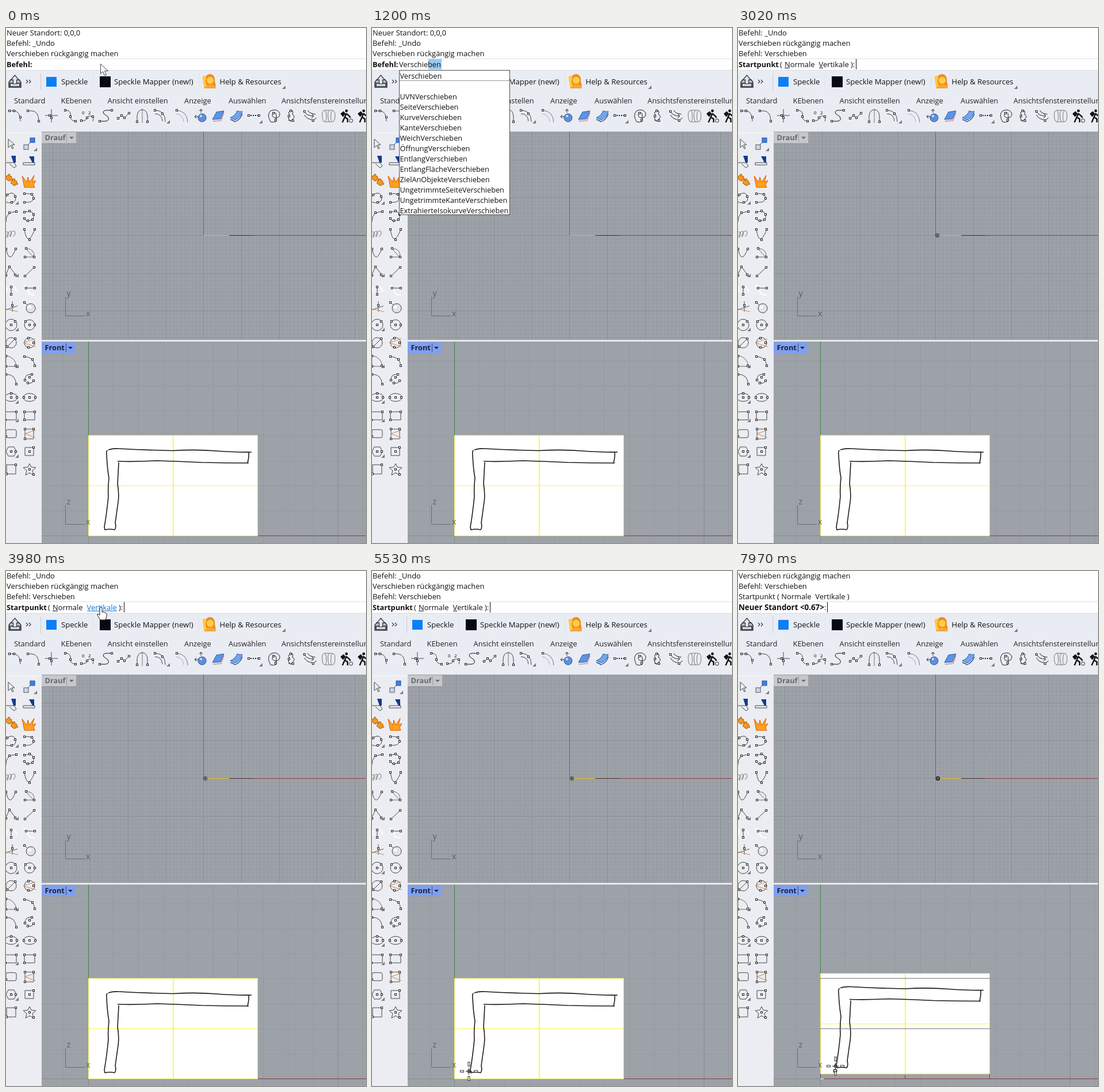
Write an HTML page that moves like this. It is 626 by 895 pixels and loops after 8 s.

```html
<!DOCTYPE html>
<html lang="de">
<head>
<meta charset="utf-8">
<title>Verschieben</title>
<style>
html, body { margin: 0; width: 100%; height: 100%; overflow: hidden; background: #fff; }
svg { display: block; width: 626px; height: 895px; font: 12.75px "Open Sans", "Noto Sans", sans-serif; }
text { white-space: pre; }
.b { font-weight: 700; }
.big { font-size: 13.35px; }
.log { font-size: 12.9px; }
.bar { font-size: 13.1px; }
.tab { font-size: 12.85px; }
</style>
</head>
<body>
<svg id="stage" viewBox="0 0 626 895" xmlns="http://www.w3.org/2000/svg"></svg>
<script>
const stage = document.getElementById('stage');

// ---- helpers ----
const rect = (x, y, w, h, fill, more = '') => `<rect x="${x}" y="${y}" width="${w}" height="${h}" fill="${fill}" ${more}/>`;
const path = (d, stroke = '#222', w = 1, fill = 'none') => `<path d="${d}" stroke="${stroke}" stroke-width="${w}" fill="${fill}"/>`;
const fill = (d, c) => path(d, 'none', 0, c);
const circle = (x, y, r, f = 'none', s = '#222', w = 1) => `<circle cx="${x}" cy="${y}" r="${r}" fill="${f}" stroke="${s}" stroke-width="${w}"/>`;
const text = (x, y, s, cls = '', c = '#111') =>
  `<text x="${x}" y="${y}" class="${cls}" fill="${c}">${s.replace(/&/g, '&amp;').replace(/</g, '&lt;')}</text>`;
const hLine = (x1, x2, y, c) => rect(x1, y, x2 - x1, 1, c);
const vLine = (x, y1, y2, c) => rect(x, y1, 1, y2 - y1, c);
const knots = s => s.split(' ').filter(Boolean).map(p => {
  const [x, y] = p.split(',').map(Number);
  return rect(x - 1.5, y - 1.5, 3, 3, '#fff', 'stroke="#222"');
}).join('');
const icon = (x, y, d, pts = '', c = '#444', extra = '') =>
  `<g transform="translate(${x} ${y})">${path(d, c)}${extra}${knots(pts)}</g>`;
const corner = (x, y) => fill(`M${x} ${y}v-6l-6 6z`, '#777b82');

// ---- command area and toolbars ----
function toolbars() {
  let s = rect(0, 73, 626, 107, '#e9ecf3') + rect(0, 180, 62, 715, '#ebedf2');
  s += hLine(0, 626, 53, '#dfe1e5') + hLine(0, 626, 73, '#d9dce2') + hLine(0, 62, 182, '#f8f9fb');
  s += path('M60.5 79V108', '#c8ccd4') + path('M151.5 79V108M335.5 79V108', '#e0e3ea');
  s += path('M8 90H23L26 94V103H5V94Z', '#2d3035', 1.4, '#b9bdc4') + rect(5, 95, 21, 8, '#474b52')
     + rect(8, 97, 15, 4, '#d5d8de') + path('M12.5 97V90H8.5L15.5 82L22 90H18.5V97Z', '#333', 1.2, '#dfe6f0');
  s += path('M35 90l3 3-3 3M40 90l3 3-3 3', '#333', 1.1);
  s += rect(70, 85, 18, 17, '#0d7ff5') + text(96, 98, 'Speckle', 'bar');
  s += rect(163, 84, 19, 19, '#060a16') + text(188, 98, 'Speckle Mapper (new!)', 'bar');
  s += fill('M346 89Q347 80 356 80Q364 82 363 92L365 101H347Z', '#f08c24')
     + circle(355, 91, 6, '#ffd04a', 'none') + fill('M344 105Q345 99 355 98Q365 98 365 105Z', '#f4a63c')
     + fill('M342 87Q341 82 344 84L346 82Q350 85 347 92L349 102H344Z', '#ffc93c');
  s += text(371.5, 98, 'Help & Resources', 'bar') + corner(486, 106);
  [[14, 'Standard'], [95.5, 'KEbenen'], [176.5, 'Ansicht einstellen'], [310, 'Anzeige'],
   [387, 'Auswählen'], [479, 'Ansichtsfenstereinstellungen']].forEach(([x, t]) => s += text(x, 131, t, 'tab', '#222'));
  return s + topIcons() + sideIcons();
}

function topIcons() {
  const y = 153, walker = circle(0, -9, 2.4, '#111', 'none')
    + path('M0-5L-3 2L2 5V11M-3 2L-7 11M0-4L5 0L7 3', '#111', 2.4) + path('M-10-4L-5-8L-2-4L-6 1Z', '#111', 1, '#111')
    + circle(8, 8, 3, '#e9ecf3', '#333');
  return [
    icon(16, y, 'M-10-9H-1Q9-7 9 9', '-10,-9 -2,-9 9,2'),
    icon(48, y, 'M-10-9H-3Q9-8 9 9', '-10,-9 9,9'),
    icon(79, y, 'M-11-1H11M0-12V11', '-3,-1 0,3'),
    icon(112, y, 'M-10-10H-6Q2-8 0 1Q0 8 9 9', '-9,-10 0,1 9,9'),
    icon(142, y, 'M-11 8Q-2 9-1 3Q1-2 9 1Q11 4 9 9', '-11,8 -1,3 9,1', '#444',
      '<text x="-10" y="-3" font-size="8">0</text><text x="1" y="-3" font-size="8">2</text>'),
    icon(174, y, 'M10-10H0Q-7-9-4-4L3 1Q7 8-1 9H-11', '10,-10 -11,9', '#111'),
    icon(205, y, 'M-10 4L-4-1L1 3L9-5', '-10,4 -4,-1 1,3 9,-5'),
    icon(237, y, 'M-9 11V0Q-8-11 0-11Q8-11 9 0V11', '-9,10 9,10', '#444', path('M0-13V12', '#777')),
    icon(269, y, 'M-10-10Q8-10 8 10M-10-4Q2-4 3 9', '-10,-10 3,-4'), corner(285, 166),
    icon(306, y, 'M-10-10Q9-9 10 11', '-9,-10', '#777', path('M-10-4Q2-2 3 10', '#aaa')),
    icon(339, y, 'M-11 1H-5M-8-2L-11 1L-8 4M0-6V-12M-3-9L0-12L3-9', '', '#222', circle(2, 3, 7, '#5f8fdd', '#294f94') + circle(0, 0, 2, '#cfe0ff', 'none')),
    icon(369, y, '', '', '', path('M-10 6L-3-7L10-9L4 5Z', '#2f5da6', 1, '#5c94e6') + path('M-9 9L5 8L10-6', '#c98686', 1.3)),
    icon(400, y, '', '', '', path('M-10 3Q-1-1 2-9Q6-7 11-8Q8 3-2 7Q-6 4-10 3Z', '#2f5da6', 1, '#72a5ec') + path('M-10 6Q-5 7-2 10Q8 6 11-4', '#294f94', 1.3)),
    icon(432, y, 'M-11-1H11', '-10,-1 8,-1', '#e9ecf3', [-7, -3, 1, 5].map(x => rect(x, -2, 2, 2, '#222')).join('')), corner(446, 166),
    icon(466, y, 'M-6 10Q-13-2-6-9Q5-14 10-5Q11 4 1 3Q-6 0-1-5Q4-8 4 0V9Q0 12-6 10Z', '-1,-5 3,7', '#222'),
    icon(496, y, 'M-2-11Q5-10 2-3Q8 0 3 5Q-1 10-5 7M2-9Q-8-8-3-2Q-8 4 0 10', '-1,-9 -4,0 3,8', '#222'),
    icon(529, y, 'M-10-8Q-6 0 6 0L3-4M6 0L2 4M-10-2Q-6 6 6 7L11 3M-4-10Q-3-5 9-3', '-10,-8 5,8', '#222'),
    icon(561, y, 'M-7-10Q-12-9-11 0Q-11 9-7 10Q-3 8-4 0Q-4-9-7-10ZM-7-10H6M-7 10H6M2-10Q-2-8-1 0Q-1 9 2 10M7-10Q12-8 11 0Q11 9 7 10Q3 8 4 0Q4-8 7-10Z', '', '#777'),
    icon(592, y, '', '', '', walker), icon(622, y, '', '', '', walker)
  ].join('');
}

function sideIcons() {
  const A = 9, B = 41, navy = '#173a8f', ring = (r = 9) => `M${-r} 0a${r} ${r} 0 1 0 ${2 * r} 0a${r} ${r} 0 1 0 ${-2 * r} 0`;
  const oval = 'M-11 0a11 7 0 1 0 22 0a11 7 0 1 0-22 0';
  const piece = 'M-4-4L-1-5Q-2-8 1-7Q3-6 1-4L5-3L4 0Q8 0 6 3Q4 4 3 2L2 5L-2 4Q-2 1-4 2Q-7 1-5-1Z';
  const rows = [
    [201, ['M-5-8V7L-1 3L2 9L4 8L1 2H6Z', ''], ['M-6 5L4-5', '', '#444', rect(1, -10, 8, 8, '#3f80e8', 'stroke="#1d4fa6"') + rect(-10, 2, 8, 8, '#c8d9f4', 'stroke="#555"')]],
    [232, ['M-9 2H5L9 8L5 11L-3 4', '', '#444', fill('M0-10H8V2H4Z', navy)], ['M-11 2H9V6H-11Z', '', '#444', fill('M-1-9H8V2H5Z', navy)]],
    [265, ['', '', '', `<g transform="translate(-4 -4)">${path(piece, '#b05c08', 1, '#f49a20')}</g><g transform="translate(5 4)">${path(piece, '#b05c08', 1, '#f49a20')}</g>`],
          ['', '', '', path('M-9 12L-13-8L-5 3L-3-6L0 3L8-9L5 3L11 0L7 7L9 12Z', '#e05a08', 1, '#ffa11c')]],
    [296, ['M-6-7Q5-13 8-2Q8 7 1 7Q-12 10-10 0Q-9-5-6-7', '-7,-6 7,-3 1,7'], ['M-9-8Q7-10 7 0Q6 8-9 7', '-9,-8 4,-7 7,0 -9,7']],
    [327, ['M-9 10Q-10-8 10-8', '9,-8 -3,-6'], ['M-9-7Q4-11 7-3Q9 7-2 8Q-8 8-9 4', '-9,-7 0,-9 7,-3 5,6 -3,8 -9,4']],
    [359, ['M-10 7Q-12-5-7-5Q-3-4-6 4Q-8 7-7 0Q-3-8 0-5Q2 0-2 4Q-3 0 1-5Q7-9 7-2Q6 3 3 3', '', '#777'], ['M-9-9Q-4 24 9-9', '-9,-9 0,9 9,-9']],
    [391, ['M-9-8Q-3 22 8-8', '-9,-7 8,-7'], ['M-7-8Q11-7 7 8M-9 7H7L-7-8', '-6,-8 -8,7 8,7', '#666']],
    [423, ['M-10 7L-3-8L8 6', '-3,-8 -9,7 7,6'], ['M-8 8L8-7', '-8,8 8,-7']],
    [455, ['M0 8V-5', '0,-5 0,8', '#444', path('M-10-7Q-6-3-8 4M3-7Q9-3 9 4', '#fff', 2)], ['M-6-3H9', '-6,-3 9,-3', '#444', path('M-11-8Q-4-7-3 2Q-2 9 9 9', '#fff', 2)]],
    [485, ['M-10 5L11-2M2-10V8', '2,-3', '#555', path('M-10 3L12 8', '#d08850')], ['M-9-8L0 0', '-9,-8', '#444', circle(2, 2, 8, '#dfe2e8', '#444') + circle(0, 0, 3, '#f7f8fa', 'none')]],
    [516, [ring(10), '0,0 7,-6'], [ring(9), '-7,-6 0,0 9,0']],
    [547, [ring(9) + 'M-7 7L7-7', '-7,7 7,-7'], [ring(9), '-2,-8 -2,8 7,0', '#444', path('M-11 0L10-7M-11 0L11 7', '#d08850')]],
    [579, ['M-9-10V9H9Q8-6-9-10', '-9,-9 -9,9 8,8', '#666'], ['M-10-8Q8-8 9 9', '-9,-8 5,-3 9,8']],
    [610, ['M-9-8Q8-9 9 11', '-9,-8 9,9'], ['M-8 3Q-9-10 5-8M8 2Q2 11-4 5', '-8,2 0,-3 4,-8 -3,7 7,3']],
    [642, [oval, '0,0 0,-7 10,0'], [oval, '-10,0 0,0 10,0']],
    [674, ['M-10-7H9V7H-10Z', '-10,7 9,-7'], ['M-9-7H9V7H-9Z', '-9,-7 9,-7 -9,7']],
    [705, ['M-6-7H6Q9-7 9-4V4Q9 7 6 7H-6Q-9 7-9 4V-4Q-9-7-6-7Z', '-9,5'], ['M-8-8H7V9H-8Z', '-8,-8 -8,9 7,-8', '#555', path('M-8 0L10-6M-8 0L10 7', '#d08850')]],
    [736, ['M-9 0L-5-8H5L9 0L5 8H-5Z', '0,0 8,0'], ['M-8-7H7V7H-8Z', '0,0 7,-7']],
    [767, ['M-8-8H8V8H-8Z', '-8,8 8,-8'], ['M0-10L3-4L11-3L5 2L7 10L0 6L-7 10L-5 2L-11-3L-3-4Z', '0,0 7,9']]
  ];
  const s = rows.map(([y, a, b]) => icon(A, y, ...a) + icon(B, y, ...b)).join('');
  return s + corner(54, 214) + [307, 433, 527, 591, 653, 685, 747].map(y => corner(22, y)).join('');
}

// ---- viewports ----
function grid(x0, y0, step, box, minor, major) {
  const [l, t, r, b] = box, out = [[], []];
  for (let i = Math.ceil((l - x0) / step); x0 + i * step < r; i++)
    out[i % 10 ? 0 : 1].push(vLine(Math.round(x0 + i * step), t, b, i % 10 ? minor : major));
  for (let i = Math.ceil((t - y0) / step); y0 + i * step < b; i++)
    out[i % 10 ? 0 : 1].push(hLine(l, r, Math.round(y0 + i * step), i % 10 ? minor : major));
  return out.flat().join('');
}
const axes = (y, up) => path(`M103.5 ${y - 33}V${y + .5}H137`, '#6a6e74')
  + `<g font-size="14" fill="#5b5f65"><text x="105.5" y="${y - 34}">${up}</text><text x="139" y="${y + 1}">x</text></g>`;
const tag = (y, name, w, bg, fg, line) => rect(62, y, w, 19, bg) + text(67.5, y + 13.5, name, 'b', fg)
  + vLine(w + 46 - (w > 59 ? 1 : 0), y + 2, y + 17, line) + fill(`M${w + 50} ${y + 8}h8l-4 4z`, fg);

function viewports() {
  let s = rect(62, 180, 564, 715, '#9da1a8');
  s += grid(343.4, 360, 6.565, [62, 180, 626, 541], '#969aa1', '#898d94');
  s += vLine(343, 180, 360, '#3d8544') + hLine(344, 626, 360, '#8f3a3f')
     + hLine(388, 430, 360, '#4a2c2e') + hLine(344, 388, 360, '#d9bd1c');
  s += axes(500, 'y') + tag(181, 'Drauf', 60, '#c5c7ca', '#66696d', '#999');
  s += rect(62, 542, 564, 3, '#e6e8ec');
  s += grid(143, 882, 43.4, [62, 545, 626, 895], '#959aa1', '#858a91');
  s += vLine(143, 545, 882, '#3d8544') + hLine(143, 626, 882, '#8f3a3f');
  return s + tag(546, 'Front', 58, '#7f9ff0', '#172038', '#33487c');
}

function sketch() {
  const pen = d => path(d, '#1b1b1b', 1.6);
  return rect(143.5, 708, 294, 174.5, '#fff', 'stroke="#eeee58"')
    + rect(290, 708, 1.6, 175, '#f8f540') + hLine(143, 438, 795, '#f8f650')
    + pen('M178 733Q186 730.5 196 731Q240 733.5 290 734.5Q330 732 366 735Q400 737.5 427 737')
    + pen('M422 737Q423 744 420 756M422 756Q380 756 340 755Q300 753 262 752Q225 754 194 753')
    + pen('M177 734Q174 734 175 742Q176 765 179 782Q177 800 178 814Q175 845 171 867L172 872Q181 870 189 872')
    + pen('M196 755Q195 776 194 792Q197 810 195 824Q192 845 190 860Q192 868 189 872');
}

// ---- pointers ----
const arrow = path('M0 0V17L4 13L7 20L10 19L7 12H13Z', '#444', 1, '#fff');
const hand = path('M-2 1Q0-2 2 1V8L9 10Q11 11 10 15L8 22H-1L-6 14Q-7 11-4 12L-2 14Z', '#222', 1, '#fff');
const slot = (x, y, w, h) => rect(x, y, w, h, '#fff', 'stroke="#333"');
const cross = path('M-5 .5H6M.5-5V6', '#222') + rect(-1.5, -1.5, 4, 4, 'none', 'stroke="#222"')
  + slot(-1, -15.5, 3, 7) + slot(-1, 9.5, 3, 7) + slot(-14.5, -1, 6, 3) + slot(9.5, -1, 6, 3);

// ---- moving state ----
const ease = u => u * u * (3 - 2 * u);
const lerp = (a, b, u) => a + (b - a) * u;
const held = (t, list) => list.reduce((v, [at, x]) => t >= at ? x : v, null);
const TRAIL = [[0, 165, 63], [1, 166, 72], [3, 173, 190], [5, 176, 430], [7, 172, 819], [8, 170, 845],
  [10, 157, 866], [12, 158, 871], [14, 168, 869]];

function mouse(t) {
  if (t >= 5850) return [t < 5960 ? 169 : t < 6170 ? 168 : 169, t >= 7970 ? 860 : t >= 7870 ? 865 : 869];
  const n = Math.max(0, Math.min(14, Math.floor((t - 3979) / 110.7 + .001)));
  const k = Math.max(1, TRAIL.findIndex(p => p[0] >= n));
  const [a, x1, y1] = TRAIL[k - 1], [b, x2, y2] = TRAIL[k], u = (n - a) / (b - a);
  return [lerp(x1, x2, ease(u)), lerp(y1, y2, u)].map(Math.round);
}

const HISTORY = ['Neuer Standort: 0,0,0', 'Befehl: _Undo', 'Verschieben rückgängig machen',
  'Befehl: Verschieben', 'Startpunkt ( Normale  Vertikale )'];
const WORD = 'Verschieben';
const early = 'UVN Seite Kurve Kante Weich Öffnung Entlang EntlangFläche ZielAnObjekte UngetrimmteSeite UngetrimmteKante ExtrahierteIsokurve';
const middle = 'UVN Kurve Seite Kante Weich Entlang Öffnung EntlangFläche ZielAnObjekte UngetrimmteKante UngetrimmteSeite ExtrahierteIsokurve';
const late = 'UVN Kurve Seite Weich Kante Entlang Öffnung ZielAnObjekte EntlangFläche UngetrimmteSeite UngetrimmteKante ExtrahierteIsokurve';

function popup(t) {
  if (t < 870 || t >= 3020) return '';
  if (t < 980) return fill('M47 73H276V613H190V396H47Z', '#fff') + path('M47.5 396V612.5H190M47.5 396V73.5H275.5V612.5H190', '#85898f');
  const names = held(t, [[0, early], [1940, middle], [2160, late]]).split(' ');
  return rect(47.5, 73.5, 192, 251, '#fff', 'stroke="#4c4c4c"') + text(48.5, 88, WORD) + hLine(48, 239, 91, '#999')
    + names.map((n, i) => text(48.5, 124 + 18 * i, n + WORD)).join('');
}

function prompt(t) {
  const caret = x => vLine(x, 54, 72, '#111');
  if (t < 3020) {
    const n = held(t, [[0, 0], [100, 1], [210, 2], [320, 3], [870, 4], [980, 5], [1090, 6], [1200, 8], [1940, 9], [2050, 10], [2160, 11]]);
    const from = [47, 55, 62, 67, 73, 79, 86, 89, 98, 106, 113, 120][n];
    return (n > 2 && n < 11 ? rect(from, 54, 121 - from, 18, '#99c9ef') : '') + text(1, 68, 'Befehl:', 'b')
      + text(47, 68, n > 2 ? WORD : WORD.slice(0, n));
  }
  if (t < 6380) {
    const hot = t >= 3980 && t < 4200, on = t < 3550 || t >= 3980, c = hot ? '#0a78d6' : '#111';
    return text(1, 68, 'Startpunkt', 'b') + text(73, 68, '(') + text(81, 68, 'Normale', 'log') + text(140.5, 68, 'Vertikale', 'log', c)
      + text(196, 68, '):') + hLine(81, 90, 69, '#111') + hLine(141, hot ? 193 : 148, 69, c) + (on ? caret(205) : '');
  }
  const on = t < 6800 || (t >= 7220 && t < 7650) || t >= 7870;
  return text(1, 68, 'Neuer Standort <0.67>', 'b big') + text(150, 68, ':') + (on ? caret(155) : '');
}

function pointer(t) {
  const at = (x, y, s) => `<g transform="translate(${x} ${y})">${s}</g>`;
  if (t < 100) return at(164.5, 62.5, arrow);
  if (t < 3020) return '';
  const [x, y] = mouse(t), picked = t >= 6380, inTop = y > 180 && y < 541;
  let s = '';
  if (!inTop) {
    const mx = Math.round(344 + (x - 143) * .15) - .5;
    s += path(`M${mx - 4} 360.5h8M${mx} 356.5v8`, '#333', .8) + rect(mx - 2.5, 358, 5, 5, 'none', 'stroke="#333" stroke-width=".8"');
    if (picked) s += circle(mx, 360.5, 3, 'none', '#111', 1.2);
  }
  if (picked) s += circle(169, 869, 2.8, '#fff', '#111', 1.3);
  if (t < 3980) return s;
  return s + (y < 80 ? at(x, y, hand) : y < 180 ? at(x, y, arrow) : at(x, y, cross));
}

// ---- assembly ----
stage.innerHTML = rect(0, 0, 626, 895, '#fff') + viewports()
  + `<g id="plan">${sketch()}</g><g id="wires">`
  + hLine(143, 438, 707.5, '#666') + hLine(143, 438, 795, '#777') + hLine(143, 149, 882, '#eee')
  + path('M143.5 874V882M290.5 876V882M437.5 874V882', '#555') + '</g>'
  + axes(862, 'z') + toolbars() + '<g id="live"></g>';
const plan = document.getElementById('plan'), wires = document.getElementById('wires'), live = document.getElementById('live');

function draw(t) {
  const lift = t >= 7970 ? 8.5 : t >= 7870 ? 4 : 0;
  plan.setAttribute('transform', `translate(0 ${-lift})`);
  wires.setAttribute('visibility', lift ? 'visible' : 'hidden');
  const first = t < 3020 ? 0 : t < 6380 ? 1 : 2;
  live.innerHTML = HISTORY.slice(first, first + 3).map((s, i) => text(1, 13 + 18 * i, s, 'log')).join('')
    + prompt(t) + popup(t) + pointer(t);
}
function tick() {
  draw(performance.now() % 8000);
  requestAnimationFrame(tick);
}
tick();
</script>
</body>
</html>
```
